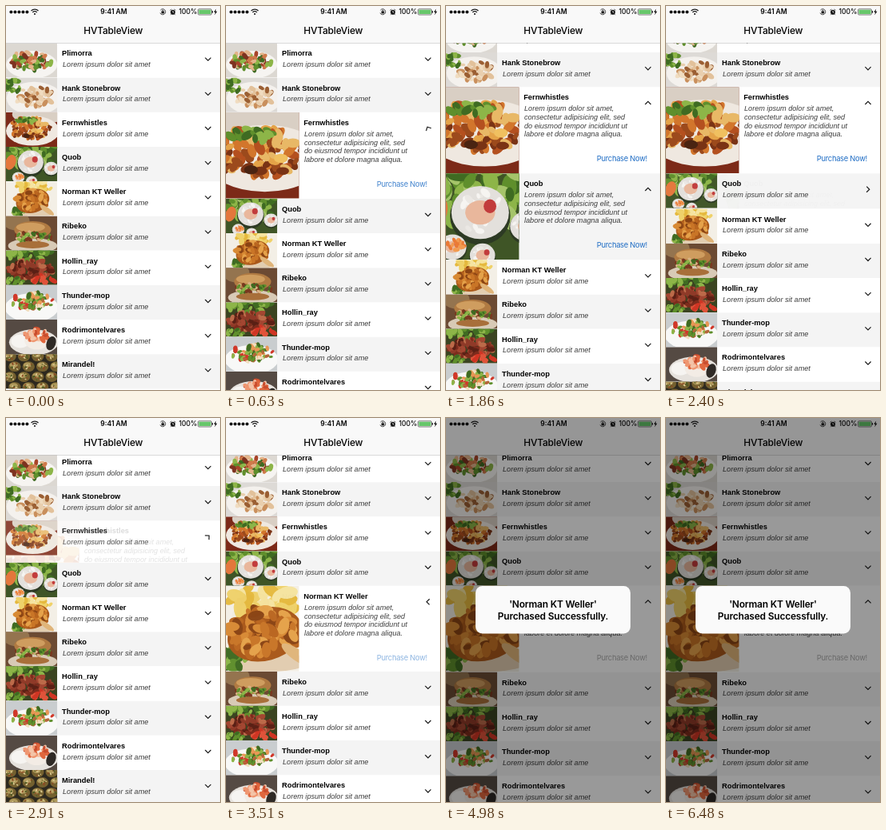
These frames come from a looping animation (268 px wide and 480 px high, 6510 ms). An HTML page:

```html
<!DOCTYPE html>
<html lang="en">
<head>
<meta charset="utf-8">
<title>HVTableView</title>
<style>
  html, body { margin: 0; width: 100%; height: 100%; overflow: hidden; background: #fff; }
  #stage { display: block; width: 268px; height: 480px; }
  text { font-family: "Liberation Sans", Arial, sans-serif; fill: #000; }
  .name { font-weight: 700; font-size: 9.3px; }
  .note { font-style: italic; font-size: 9.12px; fill: #3c3c3c; }
  .ui { font-family: Inter, Roboto, sans-serif; font-weight: 600; text-anchor: middle; }
  .big { font-size: 11.9px; letter-spacing: -.15px; }
  .small { font-size: 8.5px; font-weight: 500; }
  .buy { font-family: Inter, Roboto, sans-serif; font-size: 9.3px; letter-spacing: -.25px; text-anchor: end; }
  .line { fill: none; stroke: #1c1c1c; stroke-width: 1.2; }
  .thin { stroke-width: .8; }
</style>
</head>
<body>
<svg id="stage" viewBox="0 0 268 480">
  <defs id="dishes"></defs>
  <rect width="268" height="480" fill="#fff"/>
  <g id="table"></g>

  <g id="bar">
    <rect width="268" height="46" fill="#f9f9f9"/>
    <rect y="46" width="268" height=".5" fill="#b4b4b4"/>
    <g id="signal"></g>
    <g class="line">
      <path d="M31.5 6a6.2 6.2 0 0 1 9 0M33.3 8a3.9 3.9 0 0 1 5.4 0"/>
      <circle cx="36" cy="10" r=".5"/>
    </g>
    <text class="ui small" x="135" y="10.4" style="font-weight:600">9:41 AM</text>
    <g class="line thin">
      <path d="M193.4 5.2a3.5 3.5 0 1 1-.4 3.4"/>
      <rect x="195" y="7" width="2.8" height="2" fill="#111"/>
      <path d="M195.5 7v-.8a.9.9 0 0 1 1.8 0v.8"/>
      <circle cx="209" cy="7.8" r="2.7" fill="#111"/>
      <path d="M205.6 5.4l1.7-1.5M212.4 5.4l-1.7-1.5M207 10.2l-.8 1M211 10.2l.8 1"/>
      <path d="M209 6v2h1.3" stroke="#f9f9f9"/>
    </g>
    <text class="ui small" x="228" y="10.4">100%</text>
    <rect class="line" style="stroke-width:.6" x="240.6" y="3.8" width="16.8" height="7.2" rx="1.2"/>
    <rect x="241.5" y="4.7" width="15" height="5.4" rx=".5" fill="#66c76a"/>
    <rect x="258" y="6.1" width="1" height="2.6" fill="#111"/>
    <path d="M263.2 3.6l-3 4.2h1.9l-.8 3.4 3.2-4.5h-2z" fill="#111"/>
    <text class="ui big" x="134.3" y="34.8" style="font-weight:500">HVTableView</text>
  </g>

  <rect id="dim" width="268" height="480" opacity="0"/>
  <g id="alert" opacity="0">
    <rect x="37" y="210" width="194" height="59.5" rx="8.5" fill="#fafafa"/>
    <text class="ui big" x="134" y="237"></text>
    <text class="ui big" x="134" y="252.2">Purchased Successfully.</text>
  </g>
</svg>

<script>
const LOOP = 6510, ROW = 43.2, GROW = 64.8, TOP = 46.4;
const $ = id => document.getElementById(id);

function add(parent, tag, attrs = {}, text) {
  const el = document.createElementNS('http://www.w3.org/2000/svg', tag);
  for (const k in attrs) el.setAttribute(k, attrs[k]);
  if (text) el.textContent = text;
  parent.appendChild(el);
  return el;
}

// Dish pictures, drawn on a 100 x 75 field
function makeDish(i, paint) {
  const g = add($('dishes'), 'symbol', { id: 'dish' + i, viewBox: '0 0 100 75', preserveAspectRatio: 'xMidYMid slice' });
  let seed = 71 * (i + 1);
  const rnd = () => (seed = (seed * 16807) % 2147483647) / 2147483647;
  rnd(); rnd();
  const pen = {
    fill: c => add(g, 'rect', { width: 100, height: 75, fill: c }),
    oval: (cx, cy, rx, ry, fill, turn = 0) =>
      add(g, 'ellipse', { cx, cy, rx, ry, fill, transform: `rotate(${turn} ${cx} ${cy})` }),
    heap(cx, cy, rx, ry, n, size, colors) {
      for (let k = 0; k < n; k++) {
        const a = rnd() * 6.283, d = Math.sqrt(rnd()), s = size * (.6 + .7 * rnd());
        pen.oval(cx + rx * d * Math.cos(a), cy + ry * d * Math.sin(a), s, s * .6, colors[k % colors.length], rnd() * 180);
      }
    },
    roll(x, y, r) {
      pen.oval(x, y + r * .12, r * 1.05, r, '#2d3a24');
      pen.oval(x, y, r, r * .92, '#e3e0dc');
      pen.heap(x, y, r * .8, r * .72, 24, r * .16, ['#f6f4f1', '#ebe8e4']);
      pen.oval(x, y, r * .52, r * .42, '#e9b79c');
      pen.oval(x + r * .34, y - r * .22, r * .22, r * .24, '#c23c3c');
    }
  };
  paint(pen);
}

const greens = ['#5f8f2c', '#8db548', '#3f6b22'];
const warm = ['#d2762c', '#b4501f', '#e4a348'];
const paints = [
  p => {
    p.fill('#dcd8d2'); p.oval(50, 46, 50, 27, '#f6f4f1');
    p.heap(50, 38, 40, 17, 60, 6, [...greens, '#a8452a', '#e3b48a', '#7e3320', '#cf7a4a']);
  },
  p => {
    p.fill('#dddad6'); p.oval(55, 44, 54, 32, '#f4f1ed');
    p.heap(14, 22, 15, 15, 18, 7, greens);
    p.heap(56, 40, 38, 19, 50, 7, ['#e2c19a', '#c98f5c', '#f0dcc0', '#9b5f33', '#e9cfae']);
  },
  p => {
    p.fill('#7c2a18'); p.oval(64, 8, 52, 20, '#d9cfc4'); p.oval(52, 40, 52, 29, '#efe8e0');
    p.heap(46, 35, 40, 21, 100, 5.5, [...warm, '#7a3315', '#e8b866', '#9c4a1c']);
    p.heap(40, 18, 22, 7, 18, 5, greens);
    p.oval(40, 50, 6, 4, '#4a2412'); p.oval(66, 40, 6, 4, '#f0c060');
  },
  p => {
    p.fill('#3f5526'); p.heap(54, 18, 54, 26, 50, 10, [...greens, '#a5c46a']);
    p.roll(48, 34, 25); p.roll(24, 64, 12); p.roll(50, 71, 11); p.roll(88, 46, 14);
    p.oval(9, 34, 10, 15, '#e4773c', 20);
    p.heap(27, 62, 8, 5, 16, 2.6, ['#ea7a35', '#f29b50']);
  },
  p => {
    p.fill('#f3efe6'); p.heap(50, 14, 42, 12, 28, 8, ['#efd26a', '#e5b93e', '#f5e4a0']);
    p.oval(50, 66, 40, 9, '#e2cdb0');
    p.heap(24, 62, 14, 10, 18, 6, greens);
    p.oval(52, 42, 33, 23, '#a9581a', -15);
    p.heap(50, 40, 30, 20, 70, 6, ['#d88a34', '#b9651f', '#8a4414', '#e5a24a', '#c97527']);
    p.oval(80, 60, 16, 5, '#e0b57a', 35);
  },
  p => {
    p.fill('#6b4a33'); p.oval(20, 14, 26, 18, '#94744f'); p.oval(52, 62, 48, 15, '#d8cab6');
    p.oval(52, 31, 36, 17, '#b07a42'); p.oval(48, 26, 28, 9, '#cf9d5f');
    p.heap(52, 46, 38, 9, 50, 5, [...greens, '#7a3820', '#d9b184']);
    p.oval(52, 60, 32, 7, '#a86f3a');
  },
  p => {
    p.fill('#3b4421'); p.heap(50, 12, 50, 12, 30, 8, greens);
    p.heap(50, 42, 46, 20, 80, 7, ['#7d2c1d', '#a34631', '#5a2015', '#bc6a49', '#8f3a28']);
    p.heap(72, 62, 24, 9, 16, 6, ['#cf3524', '#e0533a']);
    p.heap(18, 64, 16, 8, 14, 6, greens);
  },
  p => {
    p.fill('#c9cdcf'); p.oval(50, 48, 52, 28, '#f8f8f7');
    p.heap(52, 36, 40, 18, 70, 6, [...greens, '#d1382a', '#e99755', '#f1dfbf', '#b5653a']);
  },
  p => {
    p.fill('#554a43'); p.oval(54, 48, 48, 25, '#e6e2dd');
    p.oval(28, 46, 18, 13, '#f6f4f1'); p.oval(60, 44, 24, 18, '#f3ece5');
    p.heap(58, 34, 22, 13, 34, 6, ['#e0673e', '#ef9670', '#c94c2d', '#f3c4a8']);
    p.oval(88, 50, 9, 14, '#2f2a26', 20);
  },
  p => {
    p.fill('#2d291f');
    for (let k = 0; k < 16; k++) {
      const x = 8 + k % 4 * 27 + (k >> 2) % 2 * 9, y = 8 + (k >> 2) * 20;
      p.oval(x, y, 12, 10, '#74602f'); p.oval(x - 2, y - 3, 8, 5, '#b09a5c');
      p.heap(x, y, 9, 7, 9, 2.2, ['#dccb92', '#4d5a23', '#8a4b24']);
    }
  }
];

const names = ['Plimorra', 'Hank Stonebrow', 'Fernwhistles', 'Quob', 'Norman KT Weller',
  'Ribeko', 'Hollin_ray', 'Thunder-mop', 'Rodrimontelvares', 'Mirandel!'];
const clipped = [2, 3, 4, 5, 7];
const taps = {
  2: { open: 300, close: 2710 },
  3: { open: 1130, close: 2150 },
  4: { open: 3260, close: Infinity }
};
const BUYER = 4, ALERT = 4650;
const story = ['Lorem ipsum dolor sit amet,', 'consectetur adipisicing elit, sed',
  'do eiusmod tempor incididunt ut', 'labore et dolore magna aliqua.'];

function makeCell(parent, i, x, height) {
  const g = add(parent, 'g');
  add(g, 'use', { href: '#dish' + i, width: x, height });
  add(g, 'text', { class: 'name', x: x + 5.8, y: 16 }, names[i]);
  return g;
}

const rows = names.map((name, i) => {
  makeDish(i, paints[i]);
  const box = add($('table'), 'svg', { width: 268, height: ROW });
  add(box, 'rect', { width: 268, height: 110, fill: i % 2 ? '#f4f4f4' : '#fff' });
  const row = { box, tap: taps[i] };
  if (row.tap) {
    row.full = makeCell(box, i, 91.4, ROW + GROW);
    story.forEach((s, k) => add(row.full, 'text', { class: 'note', x: 98, y: 30.2 + 10.7 * k }, s));
    row.buy = add(row.full, 'text', { class: 'buy', x: 252, y: 93.3 }, 'Purchase Now!');
  }
  row.brief = makeCell(box, i, 64.2, ROW);
  const note = 'Lorem ipsum dolor sit ame' + (clipped.includes(i) ? '' : 't');
  add(row.brief, 'text', { class: 'note', x: 71, y: 29.9 }, note);
  row.arrow = add(box, 'path', { class: 'line', d: 'M-3.6 -1.8L0 1.8L3.6 -1.8', transform: 'translate(253 20)' });
  return row;
});

for (let k = 0; k < 5; k++) add($('signal'), 'circle', { cx: 6.4 + 5 * k, cy: 7.4, r: 2, fill: '#111' });
$('alert').querySelector('text').textContent = `'${names[BUYER]}'`;

const clamp = x => Math.min(1, Math.max(0, x));
const ease = x => x < .5 ? 4 * x ** 3 : 1 - 4 * (1 - x) ** 3;
const run = (t, start, span) => ease(clamp((t - start) / span));

function draw(t) {
  const shown = 1 - (1 - clamp((t - ALERT) / 320)) ** 3;
  // The table scrolls to centre an opened row
  const scroll = 31.6 * (run(t, taps[3].open, 300) - run(t, taps[2].close, 300))
    + 9.6 * run(t, taps[4].open, 300);
  let y = TOP - scroll;

  for (const { box, tap, full, brief, buy, arrow } of rows) {
    let height = ROW;
    if (tap) {
      const p = run(t, tap.open, 300) - run(t, tap.close, 300);
      const turn = run(t, tap.open, 500);
      height += GROW * p;
      full.setAttribute('opacity', p);
      brief.setAttribute('opacity', 1 - p);
      buy.setAttribute('opacity', turn);
      const tint = [30, 108, 196].map(c => Math.round(c + (172 - c) * shown));
      buy.style.fill = `rgb(${tint})`;
      arrow.setAttribute('transform', `translate(253 20) rotate(${180 * (turn + run(t, tap.close, 500))})`);
    }
    box.setAttribute('y', y);
    box.setAttribute('height', height);
    y += height;
  }

  $('dim').setAttribute('opacity', .4 * shown);
  $('alert').setAttribute('opacity', shown);
  $('alert').setAttribute('transform', `translate(134 240) scale(${1.18 - .18 * shown}) translate(-134 -240)`);
}

const begin = performance.now();
function tick() {
  draw((performance.now() - begin) % LOOP);
  requestAnimationFrame(tick);
}
tick();
</script>
</body>
</html>
```
